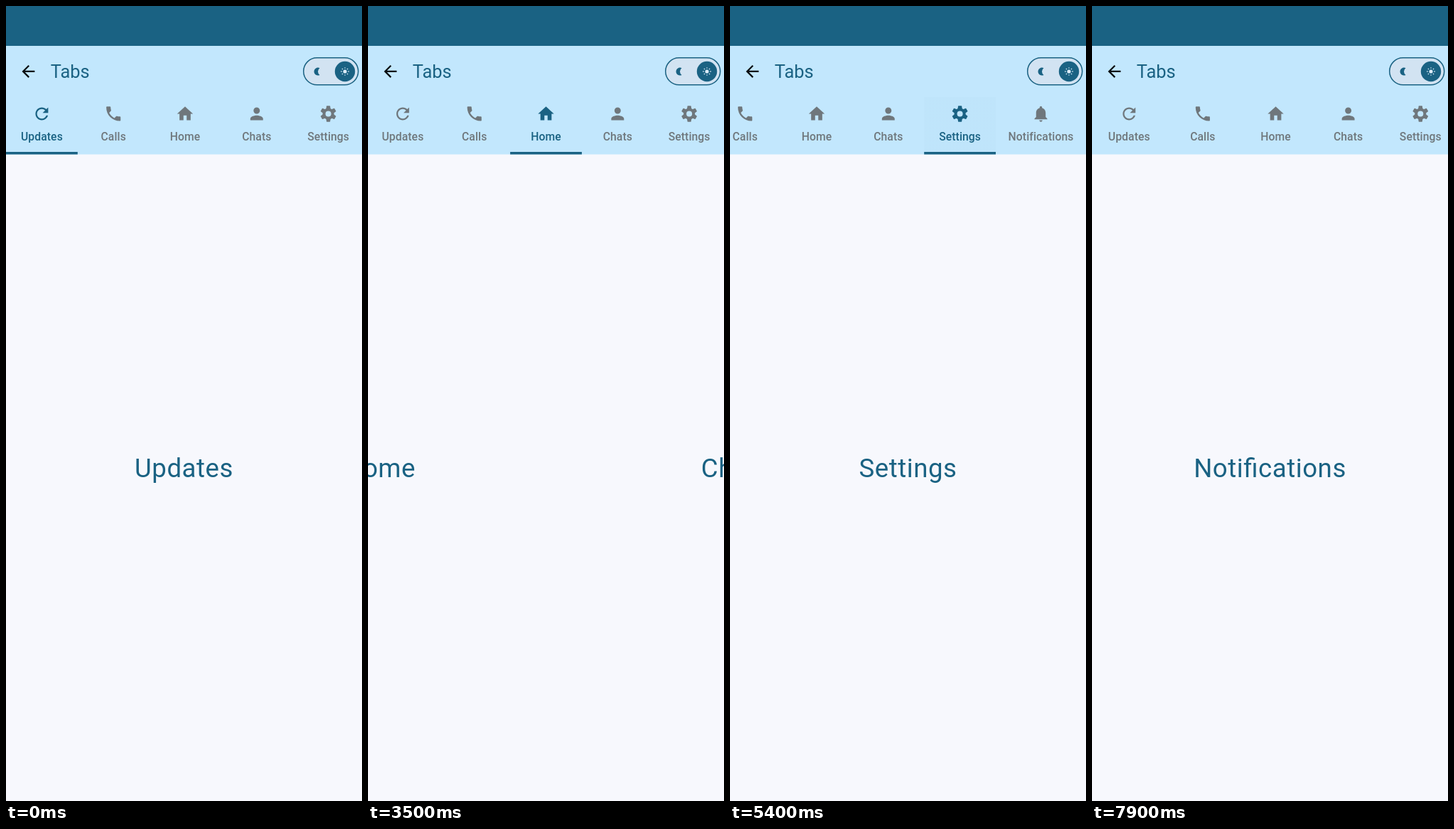
Write an HTML page that moves like this. It is 501 px wide and 1117 px high and loops after 8000 ms.

```html
<!DOCTYPE html>
<html lang="en">
<head>
<meta charset="utf-8">
<title>Tabs</title>
<style>
  html, body { margin: 0; width: 100%; height: 100%; overflow: hidden; background: #f7f8fd; }
  svg { display: block; width: 100%; height: 100%; font-family: Roboto, "Noto Sans", sans-serif; }
  .page { font-size: 36.6px; letter-spacing: .56px; font-feature-settings: "liga" 1; fill: #1a6283; text-anchor: middle; }
  .tab { fill: currentColor; }
  .tab text { font-size: 15.7px; font-weight: 500; letter-spacing: .1px; text-anchor: middle; }
</style>
</head>
<body>
<svg viewBox="0 0 501 1117">
  <defs>
    <radialGradient id="glow" gradientUnits="userSpaceOnUse">
      <stop offset="0" stop-color="#1a6283"/>
      <stop id="core" offset="0" stop-color="#1a6283"/>
      <stop offset="1" stop-color="#1a6283" stop-opacity="0"/>
    </radialGradient>
  </defs>
  <rect width="501" height="1117" fill="#f7f8fd"/>
  <g id="pages"></g>
  <rect width="501" height="208.5" fill="#c2e7fd"/>
  <rect width="501" height="56" fill="#1a6283"/>
  <path transform="translate(18 78.5) scale(1.12)" d="M20 11H7.83l5.59-5.59L12 4l-8 8 8 8 1.41-1.41L7.83 13H20v-2z" fill="#0b0f12"/>
  <text x="62.8" y="101" font-size="25.4" fill="#1a6283">Tabs</text>
  <g id="toggle">
    <rect x="418.7" y="72.8" width="77" height="38" rx="19" fill="#d2e3f2" stroke="#1a6283" stroke-width="1.5"/>
    <path d="M441.5 87.2A5.5 5.5 0 1 0 441.5 97A6 6 0 0 1 441.5 87.2z" fill="#1a6283"/>
    <circle cx="477" cy="92" r="14.2" fill="#1a6283"/>
    <circle cx="477" cy="92" r="2.6" fill="#dcecf8"/>
    <circle cx="477" cy="92" r="5" fill="none" stroke="#dcecf8" stroke-width="1.7"
      pathLength="80" stroke-dasharray="3 7" stroke-dashoffset="1.5"/>
  </g>
  <rect id="ripple" y="128" height="80.5" fill="url(#glow)"/>
  <g id="tabs"></g>
  <rect id="bar" y="205" height="3.5" fill="#1a6283"/>
</svg>
<script>
const LOOP = 8000, STEP = 100, W = 501;
const TAB_W = 100.8, LAST_W = 127, MAX_SCROLL = 130;
const SELECT_DELAY = 44, TWEEN = 250, RIPPLE = 825;
const TAPS = [465, 1940, 3465, 4665, 6365];   // each tap opens the next tab
const ACTIVE = [26, 98, 131], IDLE = [111, 119, 124];

const gear = '<circle cx="12" cy="12" r="5.4" fill="none" stroke="currentColor" stroke-width="3.6"/>' +
  [0, 60, 120, 180, 240, 300].map(a =>
    `<path transform="rotate(${a} 12 12)" d="M9.2 6l.5-3.6q.1-.4.5-.4h3.6q.4 0 .5.4l.5 3.6z"/>`).join('');
const path = d => `<path d="${d}"/>`;

const TABS = [
  ['Updates', path('M17.65 6.35C16.2 4.9 14.21 4 12 4c-4.42 0-7.99 3.58-7.99 8s3.57 8 7.99 8c3.73 0 6.84-2.55 7.73-6h-2.08c-.82 2.33-3.04 4-5.65 4-3.31 0-6-2.69-6-6s2.69-6 6-6c1.66 0 3.14.69 4.22 1.78L13 11h7V4z')],
  ['Calls', path('M6.62 10.79c1.44 2.83 3.76 5.14 6.59 6.59l2.2-2.2c.27-.27.67-.36 1.02-.24 1.12.37 2.33.57 3.57.57.55 0 1 .45 1 1V20c0 .55-.45 1-1 1-9.39 0-17-7.61-17-17 0-.55.45-1 1-1h3.5c.55 0 1 .45 1 1 0 1.25.2 2.45.57 3.57.11.35.03.74-.25 1.02z')],
  ['Home', path('M10 20v-6h4v6h5v-8h3L12 3 2 12h3v8z')],
  ['Chats', path('M12 12c2.21 0 4-1.79 4-4s-1.79-4-4-4-4 1.79-4 4 1.79 4 4 4zm0 2c-2.67 0-8 1.34-8 4v2h16v-2c0-2.66-5.33-4-8-4z')],
  ['Settings', gear],
  ['Notifications', path('M12 22c1.1 0 2-.9 2-2h-4c0 1.1.89 2 2 2zm6-6v-5c0-3.07-1.64-5.64-4.5-6.32V4c0-.83-.67-1.5-1.5-1.5s-1.5.67-1.5 1.5v.68C7.63 5.36 6 7.92 6 11v5l-2 2v1h16v-1z')]
].map(([name, icon], i) => {
  const left = i * TAB_W, width = i < 5 ? TAB_W : LAST_W, mid = left + width / 2;
  return { name, icon, left, width, mid, scroll: Math.min(MAX_SCROLL, Math.max(0, mid - W / 2)) };
});

const $ = id => document.getElementById(id);
$('pages').innerHTML = TABS.map(t => `<text class="page" y="662">${t.name}</text>`).join('');
$('tabs').innerHTML = TABS.map(t => `<g class="tab">
  <g transform="translate(-13.44 138) scale(1.12)">${t.icon}</g><text y="189.4">${t.name}</text></g>`).join('');
const pages = [...$('pages').children], tabs = [...$('tabs').children];

const clamp = v => Math.min(1, Math.max(0, v));
const mix = (a, b, k) => a + (b - a) * k;
const smooth = k => k * k * (3 - 2 * k);
const set = (el, attrs) => { for (const k in attrs) el.setAttribute(k, attrs[k]); };

// critically damped spring, 0 to 1
function spring(ms) {
  const x = Math.max(0, ms) * .045;
  return 1 - (1 + x) * Math.exp(-x);
}

// cubic-bezier(.4, 0, .2, 1), solved by bisection
function ease(u) {
  if (u <= 0 || u >= 1) return clamp(u);
  let lo = 0, hi = 1, s;
  for (let i = 0; i < 24; i++) {
    s = (lo + hi) / 2;
    const r = 1 - s, x = 1.2 * r * r * s + .6 * r * s * s + s * s * s;
    if (x < u) lo = s; else hi = s;
  }
  return s * s * (3 - 2 * s);
}

function drawRipple(t, scroll) {
  const i = TAPS.findIndex(tap => t >= tap && t < tap + RIPPLE);
  const age = t - TAPS[i];
  const alpha = i < 0 ? 0 : .155 * clamp((age - 34) / 60) * (1 - age / RIPPLE);
  $('ripple').setAttribute('opacity', alpha);
  if (!alpha) return;
  const tab = TABS[i + 1], x = tab.left - scroll;
  const r = 130 * (1 - (1 - clamp(age / 450)) ** 2);
  set($('ripple'), { x, width: tab.width });
  set($('glow'), { cx: x + tab.width / 2 + 5, cy: 158, r });
  $('core').setAttribute('offset', clamp((r - 40) / r));
}

function draw(t) {
  const since = TAPS.map(tap => t - tap - SELECT_DELAY);
  const pos = TAPS.reduce((sum, tap) => sum + spring(t - tap), 0);
  const sel = since.reduce((sum, ms) => sum + ease(ms / TWEEN), 0);
  const a = TABS[Math.floor(sel)], b = TABS[Math.ceil(sel)], k = sel % 1;

  // final drag pulls the strip back to its start and stretches it a little
  const drag = 150 * smooth(clamp((t - 7520) / 380));
  const scroll = Math.max(0, mix(a.scroll, b.scroll, k) - drag);
  const pull = clamp((drag - MAX_SCROLL) / 20);
  const place = x => x - scroll + pull * 10.5 * (1 - Math.exp(-Math.max(0, x) / 260));

  TABS.forEach((tab, i) => {
    pages[i].setAttribute('x', W / 2 + W * (i - pos));
    const come = i ? clamp((since[i - 1] - 100) / 150) : 1;
    const go = i < 5 ? clamp(since[i] / 100) : 0;
    const rgb = IDLE.map((c, n) => Math.round(mix(c, ACTIVE[n], come * (1 - go))));
    tabs[i].style.color = `rgb(${rgb})`;
    tabs[i].setAttribute('transform', `translate(${place(tab.mid)} 0)`);
  });
  set($('bar'), { x: place(mix(a.left, b.left, k)), width: mix(a.width, b.width, k) });
  drawRipple(t, scroll);
}

const start = performance.now();
function tick() {
  const t = (performance.now() - start) % LOOP;
  draw(Math.floor(t / STEP) * STEP);
  requestAnimationFrame(tick);
}
tick();
</script>
</body>
</html>
```
